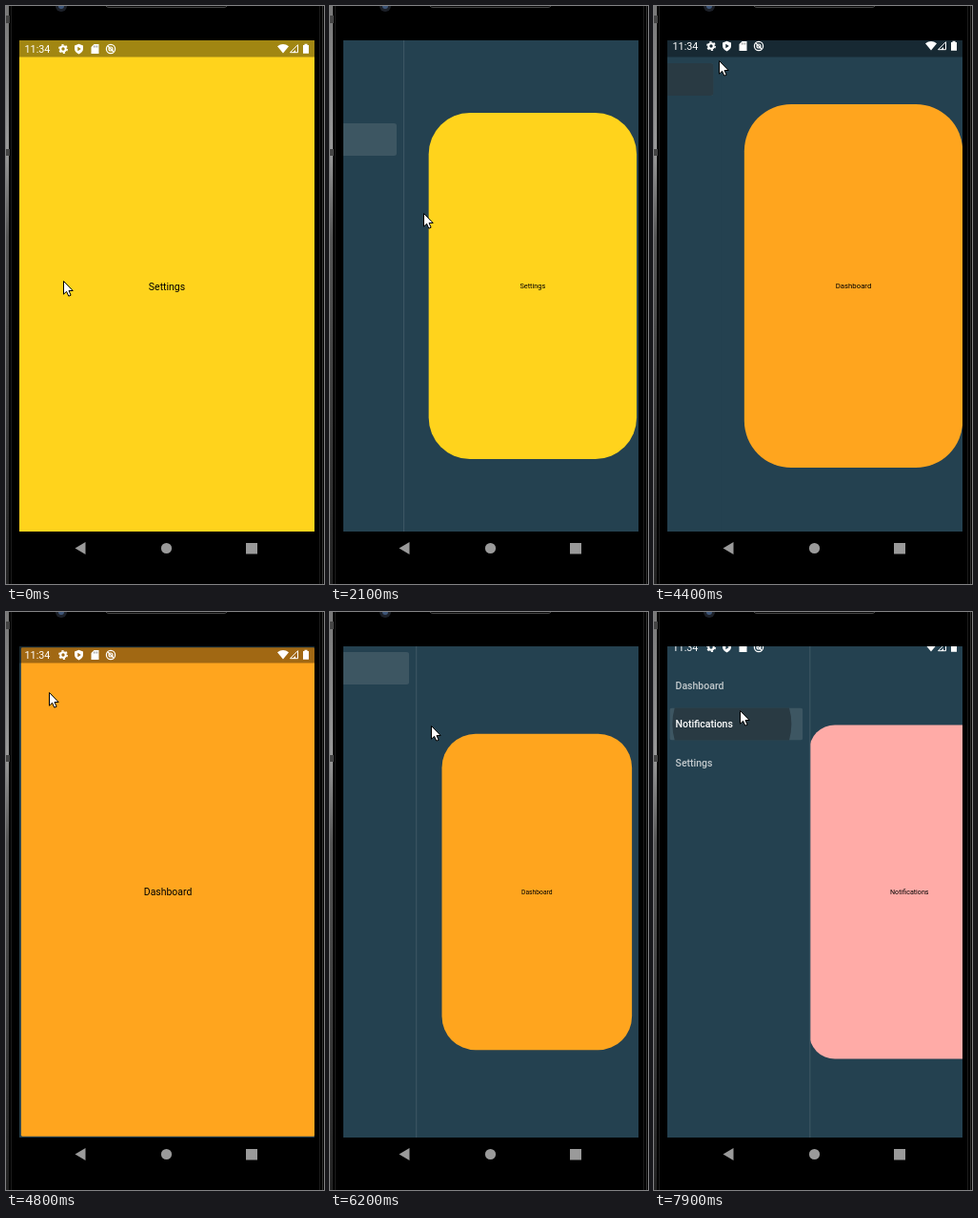
An HTML page that plays this animation: 334 by 606 pixels, repeating every 8 s.

```html
<!DOCTYPE html>
<html lang="en">
<head>
<meta charset="utf-8">
<title>Drawer navigation</title>
<style>
  html, body { margin: 0; width: 334px; height: 606px; overflow: hidden; background: #000; }
  svg { display: block; font: 10.5px Roboto, sans-serif; }
  .menu { font-weight: 500; }
</style>
</head>
<body>
<svg width="334" height="606" viewBox="0 0 334 606">
  <defs>
    <clipPath id="screen"><rect x="14" y="36" width="310" height="515"/></clipPath>
    <clipPath id="pill"><rect width="140" height="34" rx="3"/></clipPath>
    <linearGradient id="metal" x2="0" y2="1">
      <stop offset="0" stop-color="#777"/><stop offset=".25" stop-color="#999"/>
      <stop offset=".4" stop-color="#555"/><stop offset="1" stop-color="#222"/>
    </linearGradient>
  </defs>

  <!-- phone body -->
  <rect width="334" height="606"/>
  <rect width="3" height="606" fill="url(#metal)"/>
  <path d="M0 10h4v8h-4zM0 150h4v7h-4z" fill="#444"/>
  <path d="M5.5 0v606M329.5 0v606" stroke="#1b1b1b"/>
  <path d="M332.5 0v606" stroke="#333"/>
  <circle cx="58" cy="0" r="6" fill="#1c2028"/>
  <circle cx="58" cy="0" r="3" fill="#3d5578"/>
  <path d="M105 0q1 1.5 3 1.5h121q2 0 3-1.5" fill="#0a0a0a" stroke="#444"/>
  <g fill="#9a9a9a">
    <path d="M72.5 568.5l11-6.5v13z"/>
    <circle cx="168.5" cy="568.5" r="5.6"/>
    <rect x="252" y="563" width="12" height="11.5"/>
  </g>

  <g clip-path="url(#screen)">
    <rect x="14" y="36" width="310" height="515" fill="#244150"/>
    <g id="card">
      <rect id="face" x="-155" y="-257.5" width="310" height="515"/>
      <text id="title" y="4" text-anchor="middle"></text>
    </g>
    <g id="drawer">
      <rect y="36" width="155" height="515" fill="#244150"/>
      <path id="edge" d="M154.5 36v515" stroke="#fff" stroke-opacity=".13"/>
      <g id="items">
        <g id="active" clip-path="url(#pill)">
          <rect width="140" height="34" fill="#3d5662"/>
          <circle id="ripple" cx="65.5" cy="17" fill="#293a43"/>
        </g>
        <g id="labels" class="menu"></g>
      </g>
    </g>
    <rect id="bar" x="14" y="36" width="310" height="17.5" fill-opacity=".37"/>
    <g id="status" fill="#fff">
      <text x="19.5" y="48.8" font-size="10.8">11:34</text>
      <circle cx="60" cy="45" r="2.7" fill="none" stroke="#fff" stroke-width="2"/>
      <circle cx="60" cy="45" r="4.2" fill="none" stroke="#fff" stroke-width="1.5" stroke-dasharray="2.2"/>
      <path d="M76.5 39.8l4.5 1.8v3.2q0 3.6-4.5 5.6-4.5-2-4.5-5.6v-3.2zM75.3 42.8v4.4l3.5-2.2z" fill-rule="evenodd"/>
      <path d="M92.5 40h5v10h-8v-7z"/>
      <path d="M92.5 41.5v2m1.7-2v2m1.7-2v2" stroke="#777" stroke-width=".7"/>
      <g fill="none" stroke="#fff" stroke-width="1.2">
        <circle cx="110" cy="45" r="4.6"/>
        <circle cx="110" cy="45" r="2"/>
        <path d="M107 42l6 6"/>
      </g>
      <path d="M285 42.3q6-4.8 12 0l-6 7.2z"/>
      <path d="M298.5 48.7h8v-8z" fill="none" stroke="#fff"/>
      <path d="M301 49l3-3v3z"/>
      <path d="M312 41h1.500v-1.2h3v1.2h1.5v8.800h-6z"/>
    </g>
  </g>
  <path id="cursor" d="M.5.5v13.7l3.1-2.9 2.2 4.9 2.3-1-2.1-4.7h4.2z" fill="#fff" stroke="#000"/>
</svg>
<script>
const $ = id => document.getElementById(id);
const set = (id, attrs) => {
  for (const name in attrs) $(id).setAttribute(name, attrs[name]);
};
const clamp = (v, lo, hi) => Math.min(hi, Math.max(lo, v));

const LOOP = 8000, STEP = 100, DRAWER = 155, HIDDEN = -19;
const NEARLY_OPEN = .97;
const MENU = ['Dashboard', 'Notifications', 'Settings'];
const COLORS = ['#ffa51e', '#ffaba7', '#ffd31c'];
const itemY = i => 42 + i * 40.5;

// Each round: drag the drawer out, let it settle, tap an item to close it.
const ROUNDS = [
  { start: 1500, release: 2400, grabX: 34, tap: 4300, from: 2, to: 0 },
  { start: 5600, release: 6500, grabX: 29, tap: 7900, from: 0, to: 1 }
];

const MOVES = [
  { start: 300, end: 1200, x: 19, y: 209 },
  { start: 1500, end: 2400, x: 197, y: 228, power: 2 },
  { start: 3200, end: 3300, x: 168, y: 200 },
  { start: 3300, end: 4100, x: 68, y: 57 },
  { start: 4400, end: 5100, x: 27, y: 105 },
  { start: 5100, end: 5400, x: 17, y: 105 },
  { start: 5600, end: 6500, x: 181, y: 130, power: 1.5 },
  { start: 6600, end: 7400, x: 109, y: 113, power: 2 },
  { start: 7400, end: 7600, x: 90, y: 103 }
];

function cursorAt(t) {
  let x = 60, y = 288;
  for (const m of MOVES) {
    const k = clamp((t - m.start) / (m.end - m.start), 0, 1) ** (m.power || 1);
    x += (m.x - x) * k;
    y += (m.y - y) * k;
  }
  return { x, y };
}

function progress(t, round, cursorX) {
  if (t < round.start) return 0;
  if (t <= round.release) return clamp((cursorX - round.grabX) / DRAWER, 0, NEARLY_OPEN);
  if (t < round.tap) return 1 - (1 - NEARLY_OPEN) * Math.exp((round.release - t) / 180);
  const p = NEARLY_OPEN * Math.exp((round.tap - t) / 102);
  return p < .002 ? 0 : p;
}

function statusOffset(t, round) {
  if (t >= round.tap) return Math.round(-8 * Math.exp((round.tap - t) / 105));
  return Math.round(HIDDEN * clamp((t - round.start - 250) / 300, 0, 1));
}

$('labels').innerHTML = MENU.map((name, i) =>
  `<text x="13.2" y="${itemY(i) + 20.8}">${name}</text>`).join('');
const labels = [...$('labels').children];

function draw(t) {
  const round = ROUNDS.findLast(r => r.start <= t) || ROUNDS[0];
  const cursor = cursorAt(t);
  const p = progress(t, round, cursor.x);
  const s = p < .7 ? 1 - p / 1.4 : .5 + (p - .7) / 1.5;
  const sinceTap = t - round.tap, tapped = sinceTap >= 0;
  const page = tapped ? round.to : round.from;
  const statusY = statusOffset(t, round);
  const held = t <= round.release || sinceTap === 0;
  const barShown = sinceTap >= 100 || t < round.start + 200;

  set('card', { transform: `translate(${169 + s * 150.5 * p} 293.5) scale(${s})` });
  set('face', { fill: COLORS[page], rx: p && Math.min(184 * p, 24 + 15.5 / p) });
  $('title').textContent = MENU[page];

  set('drawer', { transform: `translate(${14 - DRAWER * (1 - p)} 0)` });
  set('edge', { opacity: p && held ? 1 : 0 });
  set('items', { transform: `translate(0 ${statusY > HIDDEN ? 18 : 0})` });
  set('active', { transform: `translate(7 ${itemY(page)})` });
  set('ripple', { r: tapped && sinceTap < 500 ? 62.5 + sinceTap * .4 : 0 });
  labels.forEach((label, i) => label.setAttribute('fill', i === page ? '#fff' : '#c3cacd'));

  set('bar', { opacity: +barShown });
  set('status', { transform: `translate(0 ${statusY})` });
  set('cursor', { transform: `translate(${Math.round(cursor.x)} ${Math.round(cursor.y)})` });
}

const start = performance.now();
function tick() {
  const t = (performance.now() - start) % LOOP;
  draw(Math.floor(t / STEP) * STEP);
  requestAnimationFrame(tick);
}
tick();
</script>
</body>
</html>
```
